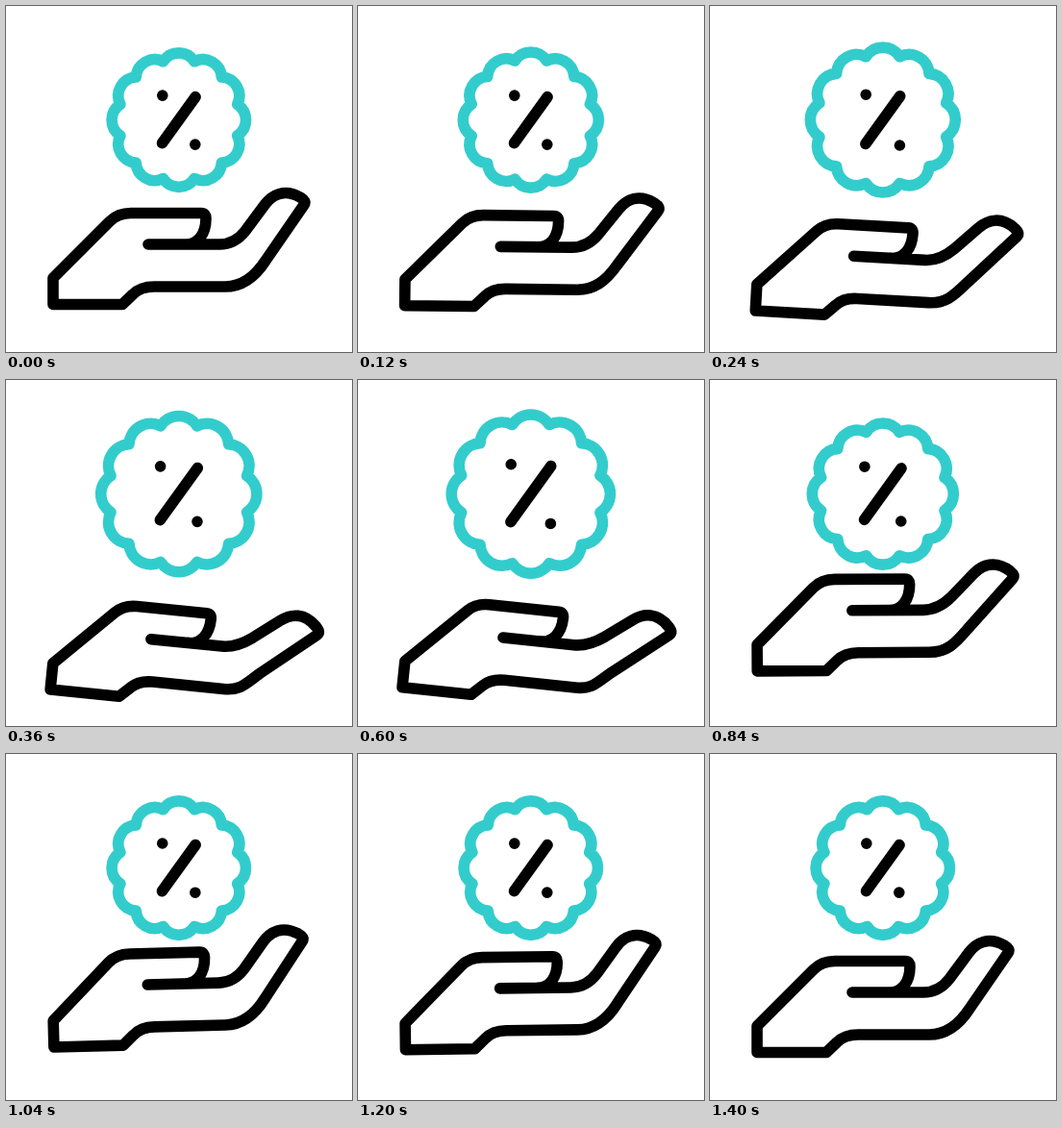
Write an HTML page that moves like this. It is 360x360 px and loops after 1440 ms.

```html
<!DOCTYPE html>
<html lang="en">
<head>
<meta charset="utf-8">
<title>Discount in hand</title>
<style>
  html, body { margin: 0; width: 100%; height: 100%; overflow: hidden; background: #fff; }
  svg { display: block; width: 100%; height: 100%; }
  path {
    fill: none; stroke: #000; stroke-width: 11.6;
    stroke-linecap: round; stroke-linejoin: round;
    vector-effect: non-scaling-stroke;
  }
  #badge { stroke: #33cccc; }
</style>
</head>
<body>
<svg viewBox="0 0 360 360">
  <path id="badge"/>
  <path id="percent" d="M17.3-24L-17.3 24M-17-25.5h.01M17 25.5h.01"/>
  <path id="hand"/>
</svg>
<script>
const LOOP = 1440, STEP = 40;
const [badge, percent, hand] = ['badge', 'percent', 'hand'].map(id => document.getElementById(id));

// Sine ease from 0 to 1 between two times.
function ease(t, from, to) {
  const x = Math.min(1, Math.max(0, (t - from) / (to - from)));
  return (1 - Math.cos(Math.PI * x)) / 2;
}

const swell = t => ease(t, 55, 460) - ease(t, 552, 1002);

// Arcs meeting on a circle.
function scallops(n, radius, lobe) {
  let d = '';
  for (let i = 0; i <= n; i++) {
    const a = (i - 0.5) * 2 * Math.PI / n;
    const p = `${radius * Math.cos(a)} ${radius * Math.sin(a)}`;
    d += i ? `A${lobe} ${lobe} 0 0 1 ${p}` : `M${p}`;
  }
  return d + 'Z';
}

// The fingers turn rigidly about the knuckle; the palm stays put.
function handPath(angle) {
  const cos = Math.cos(angle), sin = Math.sin(angle);
  const f = (x, y) => {
    const dx = x - 244, dy = y - 250;
    return `${244 + dx * cos - dy * sin} ${250 + dx * sin + dy * cos} `;
  };
  const fingers =
    `C234 248 ${f(242, 243)}${f(249, 234)}L${f(269, 207)}` +
    `C${f(277, 196)}${f(290, 190)}${f(306, 199)}` +
    `C${f(311, 202)}${f(312, 204)}${f(310, 207)}L${f(270, 265)}` +
    `C${f(259, 282)}246 292 228 292`;
  const wrist = 'H154C145 292 138 294 132 300L121 310.5H49V283L108 224';
  const thumb = 'C114 218 120 215.5 130 215.5H203Q208 215.5 208 221C208 237 200 248 187 248';
  return 'M148 248H222' + fingers + wrist + thumb;
}

function draw(time) {
  const t = Math.floor(time % LOOP / STEP) * STEP;
  const lower = ease(t, 40, 430), settle = ease(t, 1000, 1400);
  const drop = 23.5 * lower - 31.7 * ease(t, 535, 835) + 8.2 * settle;
  const tilt = 6.2 * lower - 7.7 * ease(t, 560, 935) + 1.5 * settle;
  const bend = ease(t, 40, 410) - ease(t, 635, 1025);

  badge.setAttribute('transform', `translate(179.8 118.6) scale(${1 + 0.19 * swell(t)})`);
  percent.setAttribute('transform', `translate(179.8 118.6) scale(${1 + 0.21 * swell(t - 75)})`);
  hand.setAttribute('transform', `translate(${tilt / 2} ${drop}) rotate(${tilt} 148 248)`);
  hand.setAttribute('d', handPath(bend * 0.288));
}

badge.setAttribute('d', scallops(12, 63, 19.4));
const start = performance.now();
function tick() {
  draw(performance.now() - start);
  requestAnimationFrame(tick);
}
tick();
</script>
</body>
</html>
```
